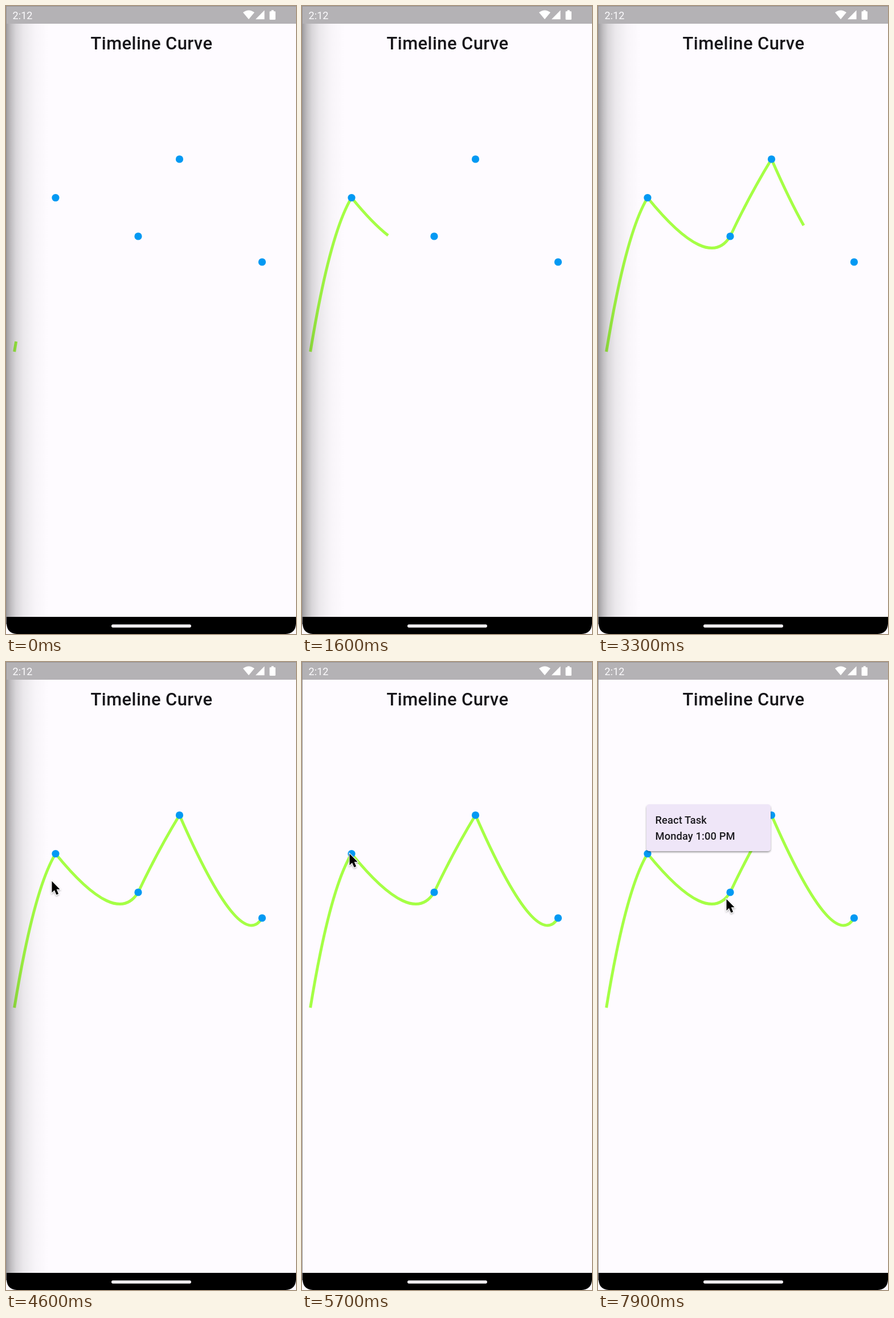
Write an HTML page that moves like this. It is 509x1099 px and loops after 8 s.

```html
<!DOCTYPE html>
<html lang="en">
<head>
<meta charset="utf-8">
<title>Timeline Curve</title>
<style>
  html, body { margin: 0; width: 100%; height: 100%; overflow: hidden; background: #fefbff; }
  svg { display: block; width: 509px; height: 1099px; }
  text { font-family: Roboto, sans-serif; }
  .item { font-size: 18.3px; font-weight: 500; letter-spacing: .12px; fill: #1b1a1f; }
</style>
</head>
<body>
<svg viewBox="0 0 509 1099">
  <defs>
    <linearGradient id="edge">
      <stop offset="0" stop-opacity=".36"/>
      <stop offset=".11" stop-opacity=".24"/>
      <stop offset=".22" stop-opacity=".15"/>
      <stop offset=".4" stop-opacity=".075"/>
      <stop offset=".68" stop-opacity=".025"/>
      <stop offset="1" stop-opacity="0"/>
    </linearGradient>
    <filter id="lift" x="-20%" y="-20%" width="140%" height="150%">
      <feDropShadow dx="0" dy="2" stdDeviation="1.8" flood-opacity=".38"/>
    </filter>
    <filter id="soft" x="-40%" y="-30%" width="180%" height="170%">
      <feDropShadow dx="0" dy="1.5" stdDeviation="1.4" flood-opacity=".35"/>
    </filter>
  </defs>

  <rect width="509" height="1099" fill="#fefbff"/>
  <text x="148.6" y="76" font-size="31" font-weight="500" letter-spacing=".4" fill="#18171b">Timeline Curve</text>

  <path id="curve" fill="none" stroke="#a5ff45" stroke-width="5"/>
  <g id="dots" fill="#0299f3"></g>
  <rect id="shade" x="1" y="31" width="74" height="1038" fill="url(#edge)"/>

  <g id="card">
    <rect id="panel" x="85" y="249" height="82" rx="5" fill="#efe6f8" filter="url(#lift)"/>
    <g id="label">
      <text class="item" x="100.5" y="282.5">React Task</text>
      <text class="item" x="100.5" y="311">Monday 1:00 PM</text>
    </g>
  </g>

  <rect width="509" height="31" fill="#b4b2b5"/>
  <rect width="509" height="1" fill="#979598"/>
  <text x="11.5" y="22.5" font-size="18.2" fill="#fbfafc">2:12</text>
  <g fill="#fff">
    <path d="M426 23.3 L416 11.3 Q426 3.6 436 11.3 Z"/>
    <path d="M438 23.3 L453.6 7.6 V23.3 Z"/>
    <path d="M463.8 9.2 H465.8 V7.2 H469.8 V9.2 H471.8 Q473 9.2 473 10.4 V22.8 Q473 24 471.8 24 H463.8 Q462.6 24 462.6 22.8 V10.4 Q462.6 9.2 463.8 9.2 Z"/>
  </g>
  <path d="M1 1069 H509 V1081 Q508 1098 491 1099 H19 Q2 1098 1 1081 Z"/>
  <rect x="185" y="1082.3" width="140" height="5.4" rx="2.7" fill="#f1eff2"/>
  <rect width="1" height="1082" fill="#949295"/>

  <path id="cursor" d="M0 0 V20 L4.5 15.7 L8 23.8 L11.6 22.2 L8.2 14.3 H14 Z"
        stroke="#fff" stroke-width="2" paint-order="stroke" filter="url(#soft)"/>
</svg>
<script>
  const LOOP = 8000, STEP = 100, SPEED = 0.2215, LEAD = 81;
  const $ = id => document.getElementById(id);
  const clamp = v => Math.max(0, Math.min(1, v));
  const show = (el, on) => el.setAttribute('visibility', on ? 'visible' : 'hidden');

  // Every bend uses a control point at the same offset from its end point.
  const points = [[87, 335.5], [232, 403], [304.5, 268], [449.5, 448]];
  $('curve').setAttribute('d', 'M14.7 605' +
    points.map(([x, y]) => ` Q${x - 38.5} ${y + 63} ${x} ${y}`).join(''));
  $('dots').innerHTML = points.map(([x, y]) => `<circle cx="${x}" cy="${y}" r="6.6"/>`).join('');

  const easeOut = u => 1 - (1 - u) ** 2;
  const smooth = u => u * u * (3 - 2 * u);
  // start, end, from, to, easing
  const moves = [
    [4100, 4600, [128, 962], [80.5, 383.5], easeOut],
    [4600, 5600, [80.5, 383.5], [83.5, 335.5], smooth],
    [7500, 7900, [83.5, 335.5], [225.5, 415], smooth]
  ];

  function cursorAt(t) {
    const [a, b, from, to, ease] = moves.filter(m => t >= m[0]).pop() || moves[0];
    const u = ease(clamp((t - a) / (b - a)));
    return from.map((v, i) => v + (to[i] - v) * u);
  }

  function draw(t) {
    $('curve').setAttribute('stroke-dasharray', `${SPEED * (t + LEAD)} 2000`);
    show($('shade'), t < 5500);

    show($('cursor'), t >= 4100);
    $('cursor').setAttribute('transform', `translate(${cursorAt(t)})`);

    const p = clamp((t - 6950) / 300), grow = clamp(p / 0.4);
    show($('card'), p > 0);
    $('card').setAttribute('opacity', clamp(p * 3));
    $('panel').setAttribute('width', 218 * grow);
    $('panel').setAttribute('height', 82 * grow);
    $('label').setAttribute('opacity', clamp((p - 0.4) / 0.6));
  }

  const start = performance.now();
  function tick() {
    const t = (performance.now() - start) % LOOP;
    draw(Math.floor(t / STEP) * STEP);
    requestAnimationFrame(tick);
  }
  tick();
</script>
</body>
</html>
```
